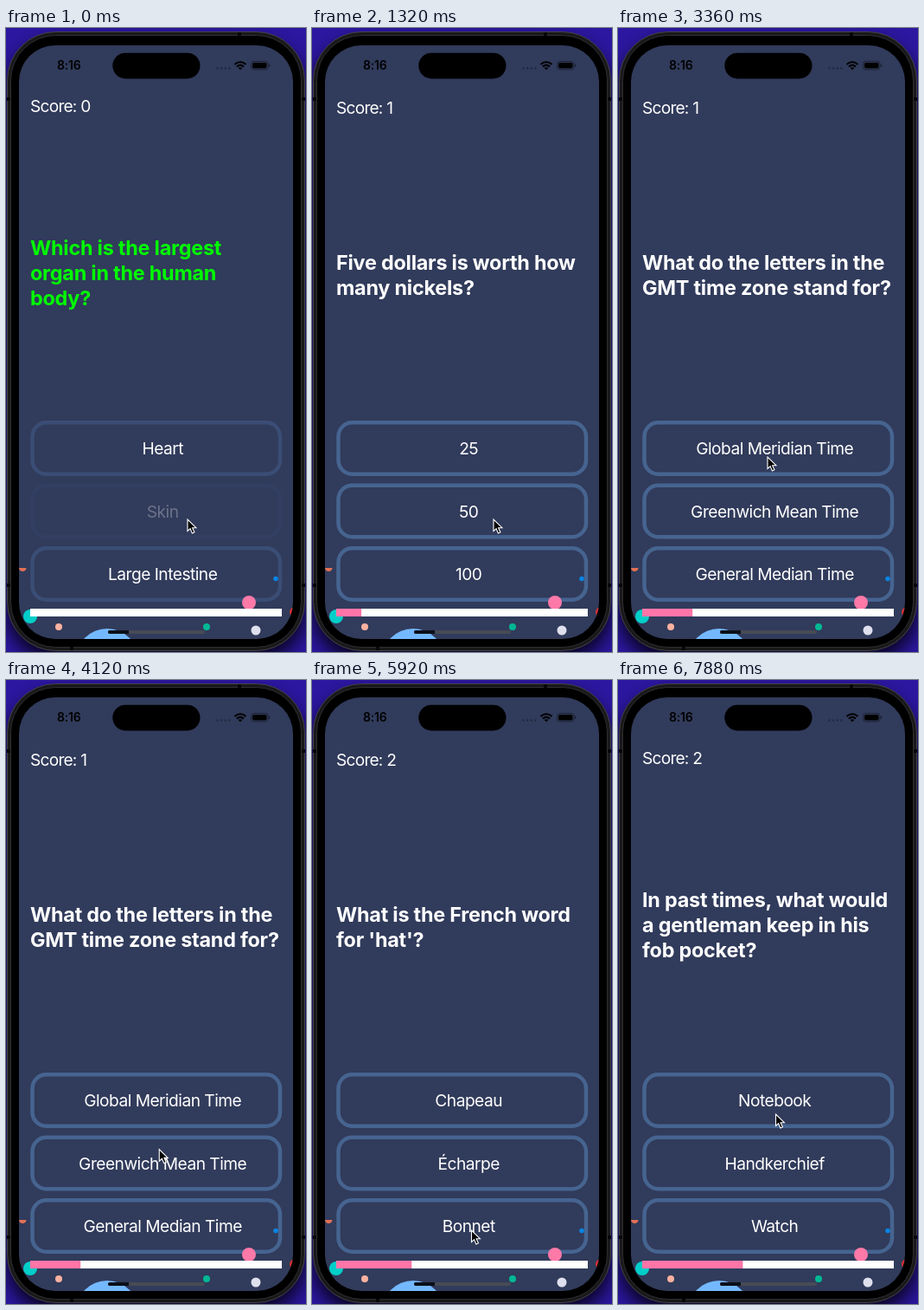
Animation of 347x720 px, one loop 8000 ms. Source, as an HTML page:

```html
<!DOCTYPE html>
<html lang="en">
<head>
<meta charset="utf-8">
<title>Quiz</title>
<style>
  html, body { margin: 0; width: 100%; height: 100%; overflow: hidden; background: #190a68; }
  svg { display: block; width: 347px; height: 720px; }
  text { font-family: Inter, "Noto Sans", sans-serif; fill: #fff; }
  .plain { font-size: 19.2px; letter-spacing: -.53px; }
  #score { letter-spacing: -.8px; }
  .question { font-size: 23.4px; font-weight: 700; letter-spacing: -.24px; }
  .answer { text-anchor: middle; }
  .clock { font-size: 14px; font-weight: 600; letter-spacing: -.2px; fill: #000; }
  .border { fill: none; stroke-width: 4.5; }
</style>
</head>
<body>
<svg viewBox="0 0 347 720">
  <defs>
    <filter id="blur" x="-30%" y="-30%" width="160%" height="160%">
      <feGaussianBlur stdDeviation="10"/>
    </filter>
    <clipPath id="screen"><rect x="15" y="20" width="317" height="685" rx="42"/></clipPath>
  </defs>

  <!-- desktop, shadow and phone body -->
  <rect width="347" height="720" fill="#2c17a0"/>
  <rect x="1" y="16" width="345" height="714" rx="56" opacity=".8" filter="url(#blur)"/>
  <rect x="1.5" y="4.5" width="344" height="714" rx="56" fill="#19191b" stroke="#444448"/>
  <rect x="5.5" y="8.5" width="336" height="706" rx="52" fill="#000" stroke="#303033"/>
  <path d="M1 82h4M342 82h4M1 643h4M342 643h4M270 5v4M76 714v4" stroke="#08080a" stroke-width="4"/>

  <g clip-path="url(#screen)">
    <rect x="15" y="20" width="317" height="685" fill="#313b5b"/>
    <text id="score" class="plain" x="28"/>
    <g id="question"></g>
    <g id="buttons"></g>

    <!-- bubbles -->
    <path d="M15 623h8.500a4.200 4 0 0 1-8.500 0" fill="#e17055"/>
    <circle cx="28" cy="679" r="8" fill="#00cec9"/>
    <circle cx="61" cy="691" r="4" fill="#fab1a0"/>
    <circle cx="117" cy="729.5" r="36.5" fill="#74b9ff"/>
    <circle cx="232" cy="691" r="4" fill="#00b894"/>
    <circle cx="289" cy="695" r="5.5" fill="#dfe0ee"/>
    <circle cx="281" cy="663" r="8" fill="#fd79a8"/>
    <circle cx="312" cy="635.5" r="2.8" fill="#0984e3"/>
    <circle cx="333.5" cy="674" r="5.5" fill="#d63031"/>

    <rect x="28" y="670" width="291" height="9" fill="#fff"/>
    <rect id="progress" x="28" y="670" height="9" fill="#ff75a8"/>
    <rect x="118" y="695" width="112" height="4" rx="2" fill="#474b54"/>
    <path d="M142 695h-22a2 2 0 0 0 0 4h22z" fill="#0b1019"/>
  </g>

  <!-- status bar -->
  <text class="clock" x="59" y="48">8:16</text>
  <rect x="123.3" y="28.700" width="101.200" height="29.700" rx="14.800"/>
  <path d="M243.5 46.5h16" stroke="#1f263e" stroke-width="2" stroke-dasharray="2 2.6"/>
  <g fill="none" stroke="#000" stroke-width="2.1">
    <path d="M264.5 42q6.5-5.5 13 0M267 44.6q4-3.3 8 0"/>
    <path d="M269.2 46l1.8 2 1.8-2z" stroke-width="1" fill="#000"/>
  </g>
  <rect x="283.5" y="38.5" width="19.5" height="9.5" rx="3" fill="none" stroke="#1c2235"/>
  <rect x="285" y="40" width="16.5" height="6.5" rx="1.8"/>
  <path d="M304.5 41.5v3.5" stroke="#1c2235" stroke-width="1.3"/>

  <path id="cursor" d="M0 0v13.5l3.1-2.9 2.3 5.3 2.5-1.1-2.3-5.1h4.3z" stroke="#fff" stroke-width="1.1"/>
</svg>
<script>
const LOOP = 8000;
const PRESS = 100, RELEASE = 300;
const GREEN = '#00ff00', RED = '#fb0000';

// Each round lasts until `end`; tapping `choice` at `tap` colours the question.
const rounds = [
  { lines: ['Which is the largest', 'organ in the human', 'body?'],
    answers: ['Heart', 'Skin', 'Large Intestine'],
    score: 0, tap: 0, choice: 1, color: GREEN, end: 800 },
  { lines: ['Five dollars is worth how', 'many nickels?'],
    answers: ['25', '50', '100'],
    score: 1, tap: 2350, choice: 0, color: RED, end: 3150 },
  { lines: ['What do the letters in the', 'GMT time zone stand for?'],
    answers: ['Global Meridian Time', 'Greenwich Mean Time', 'General Median Time'],
    score: 1, tap: 4650, choice: 1, color: GREEN, end: 5450 },
  { lines: ['What is the French word', "for 'hat'?"],
    answers: ['Chapeau', 'Écharpe', 'Bonnet'],
    score: 2, tap: 6400, choice: 2, color: RED, end: 7200 },
  { lines: ['In past times, what would', 'a gentleman keep in his', 'fob pocket?'],
    answers: ['Notebook', 'Handkerchief', 'Watch'],
    score: 2, tap: Infinity, choice: 0, color: RED, end: LOOP }
];

// Cursor moves: start, end, destination
const startPoint = [210, 567];
const moves = [
  [1550, 2150, 173, 495],
  [3600, 4350, 178.5, 555],
  [5450, 5850, 184.5, 635],
  [7250, 7750, 182.5, 501]
];

const $ = id => document.getElementById(id);
const clamp = v => Math.min(1, Math.max(0, v));
const ease = v => v * v * (3 - 2 * v);

function add(parent, tag, attrs) {
  const node = document.createElementNS('http://www.w3.org/2000/svg', tag);
  for (const key in attrs) node.setAttribute(key, attrs[key]);
  return parent.appendChild(node);
}

const buttons = [0, 1, 2].map(i => {
  const y = 455.3 + i * 72.5;
  const group = add($('buttons'), 'g', {});
  return {
    border: add(group, 'rect', { class: 'border', x: 30.5, y, width: 286.5, height: 59.4, rx: 16 }),
    label: add(group, 'text', { class: 'plain answer', x: 181.2, y: y + 36.7 })
  };
});

let shown = -1;
function showRound(index) {
  if (index === shown) return;
  shown = index;
  const { lines, answers, score } = rounds[index];
  const tall = lines.length === 3;
  $('score').textContent = 'Score: ' + score;
  $('score').setAttribute('y', tall ? 97 : 99);
  $('question').replaceChildren();
  lines.forEach((line, i) => {
    const y = (tall ? 262.3 : 279) + i * 28.8;
    add($('question'), 'text', { class: 'question', x: 28, y }).textContent = line;
  });
  buttons.forEach((button, i) => button.label.textContent = answers[i]);
  $('progress').setAttribute('width', 29.1 * index);
}

function cursorAt(t) {
  let [x, y] = startPoint;
  for (const [from, to, endX, endY] of moves) {
    const k = ease(clamp((t - from) / (to - from)));
    x += (endX - x) * k;
    y += (endY - y) * k;
  }
  return `translate(${x} ${y})`;
}

function draw(t) {
  const index = rounds.findIndex(round => t < round.end);
  const { tap, choice, color } = rounds[index];
  showRound(index);

  const answered = t >= tap;
  for (const line of $('question').children) line.style.fill = answered ? color : '#fff';

  const pressed = t < tap - PRESS ? 0 : 1 - clamp((t - tap) / RELEASE);
  buttons.forEach(({ border, label }, i) => {
    const held = i === choice ? pressed : 0;
    border.style.stroke = answered ? '#3a4d75' : '#466490';
    border.style.opacity = 1 - 0.72 * held;
    label.style.opacity = 1 - 0.72 * held;
  });
  $('cursor').setAttribute('transform', cursorAt(t));
}

const start = performance.now();
function tick() {
  draw((performance.now() - start) % LOOP);
  requestAnimationFrame(tick);
}
tick();
</script>
</body>
</html>
```
